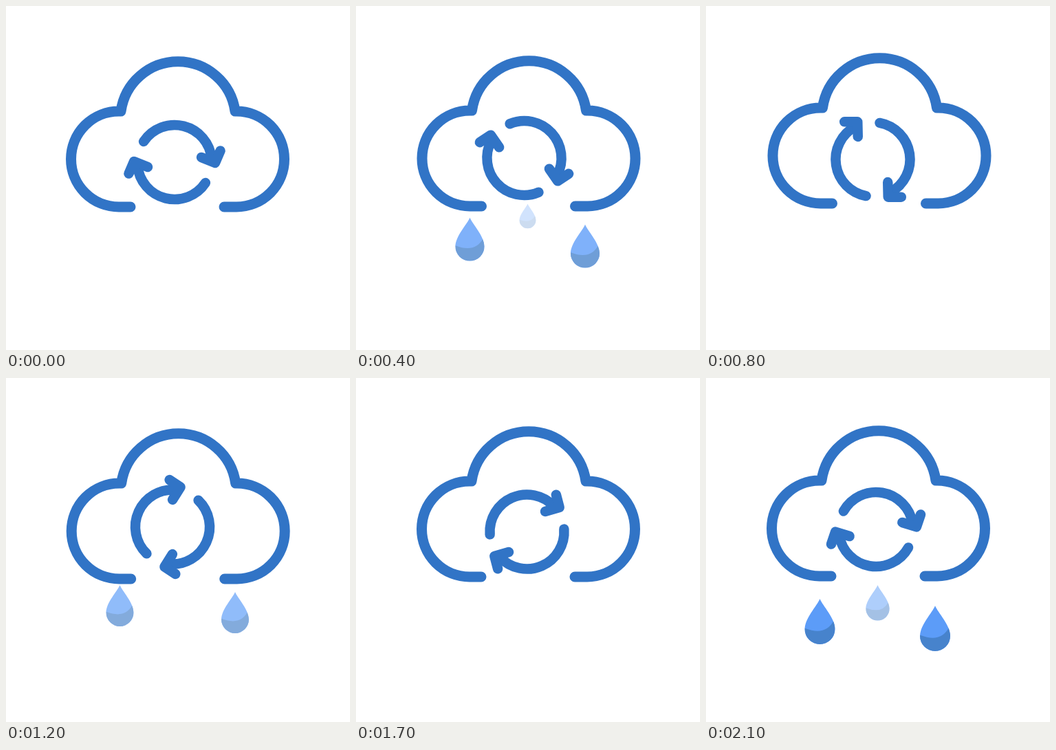
These frames come from a looping animation (500 by 500 pixels, 2200 ms). An HTML page:

```html
<!DOCTYPE html>
<html lang="en">
<head>
<meta charset="utf-8">
<title>Cloud sync</title>
<style>
  html, body { margin: 0; width: 100%; height: 100%; overflow: hidden; background: #fff; }
  svg { display: block; width: 100vw; height: 100vh; }
  .line { fill: none; stroke: #3174c6; stroke-width: 15; stroke-linecap: round; stroke-linejoin: round; }
  .thin { stroke-width: 14.5; }
</style>
</head>
<body>
<svg viewBox="0 0 500 500">
  <defs>
    <clipPath id="dropShape">
      <path id="dropPath" d="M0 0C4 10 22 28 22 44A22 22 0 0 1 -22 44C-22 28 -4 10 0 0Z"/>
    </clipPath>
    <g id="drop">
      <use href="#dropPath" fill="#4890f8"/>
      <path d="M-24 42L-21 43Q8 54 20 32L26 28V70H-24Z" fill="#3174c6" clip-path="url(#dropShape)"/>
    </g>
    <g id="arrow" class="line thin">
      <path d="M-44.9 -30A54 54 0 0 1 53.8 -5"/>
      <path d="M39 -7L59 1L66.5 -16.5"/>
    </g>
  </defs>
  <use class="drop" href="#drop"/>
  <use class="drop" href="#drop"/>
  <use class="drop" href="#drop"/>
  <path id="cloud" class="line"
    d="M181 292H164A69.5 69.5 0 0 1 164 153H167A83.8 83.8 0 0 1 333 153H335A69.5 69.5 0 0 1 335 292H317"/>
  <g id="sync">
    <use href="#arrow"/>
    <use href="#arrow" transform="rotate(180)"/>
  </g>
</svg>
<script>
  const LOOP = 2200, STEP = 100;
  const cloud = document.getElementById('cloud');
  const sync = document.getElementById('sync');
  const drops = document.querySelectorAll('.drop');

  // Knots are [time, x, y].
  const cloudPath = [[0, 0, 0], [200, -0.7, 2], [400, 1.5, -1], [800, 2.5, -5], [1200, 0.7, 0],
    [1400, -0.3, 2], [1700, 1, -3], [1900, 1.5, -4], [2100, 1, -4]];
  const syncPath = [[0, 245, 227], [400, 244.5, 221], [800, 242.5, 223], [1200, 242, 216.5],
    [1400, 244.5, 222], [1700, 248.5, 223.5], [2100, 247, 220]];

  // Each drop: x, tip height at the start of the fall, lag in pixels of fall.
  const dropSpecs = [[165.5, 301, 0], [249.5, 281, 31], [333, 311, 0]];
  const falls = [368, 1200, 2000];

  function track(knots, t) {
    const i = Math.max(1, knots.findIndex(k => k[0] >= t));
    const [a, b] = [knots[i - 1], knots[i]];
    const u = (1 - Math.cos(Math.PI * (t - a[0]) / (b[0] - a[0]))) / 2;
    return [a[1] + (b[1] - a[1]) * u, a[2] + (b[2] - a[2]) * u];
  }

  function drawDrops(t) {
    const start = falls.find(s => t >= s - 150 && t < s + 250);
    drops.forEach((el, i) => {
      const [x, y, lag] = dropSpecs[i];
      const fall = (t - start) / 5;
      const age = fall - lag;
      const shown = start !== undefined && age > -26;
      el.style.display = shown ? '' : 'none';
      if (!shown) return;
      const size = 1 - (Math.max(0, 20 - age) / 66) ** 2;
      el.setAttribute('transform', `translate(${x} ${y + fall}) scale(${size})`);
      el.setAttribute('opacity', Math.min(1, 0.6 + 0.0145 * age));
    });
  }

  function draw(now) {
    const t = Math.floor((now % LOOP) / STEP) * STEP;
    cloud.setAttribute('transform', `translate(${track(cloudPath, t)})`);
    sync.setAttribute('transform', `translate(${track(syncPath, t)}) rotate(${t * 0.0836})`);
    drawDrops(t);
  }

  const begin = performance.now();
  function tick() {
    draw(performance.now() - begin);
    requestAnimationFrame(tick);
  }
  tick();
</script>
</body>
</html>
```
